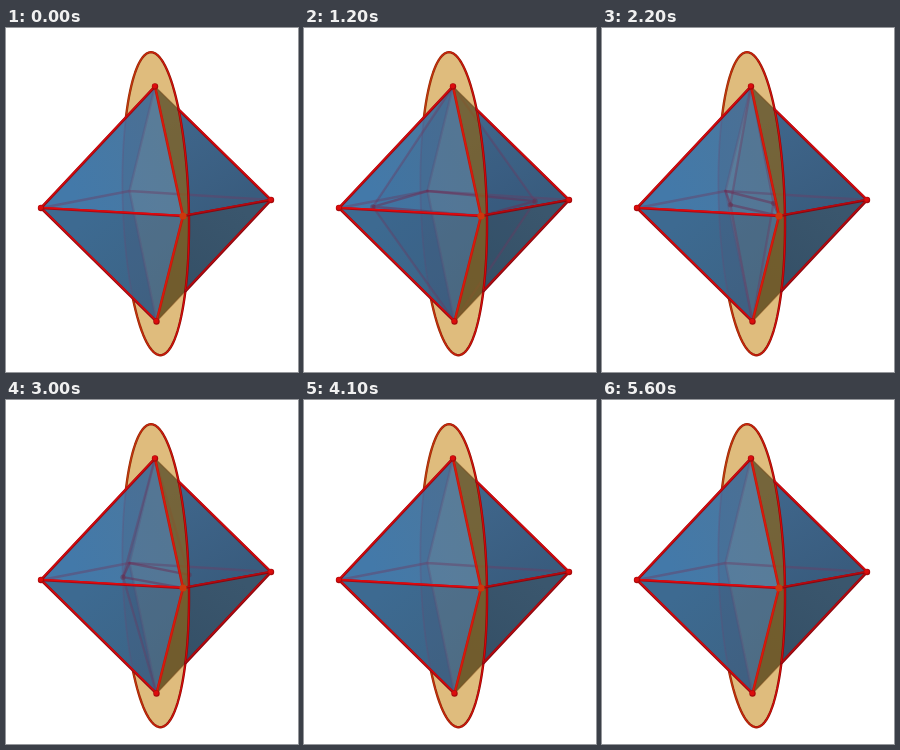
An HTML page with a canvas for the animation above (5700 ms loop, 292 px wide and 344 px high).

```html
<!DOCTYPE html>
<html lang="en">
<head>
<meta charset="utf-8">
<title>Octahedron reflection</title>
<style>
html, body { margin: 0; width: 100%; height: 100%; overflow: hidden; background: #fff; }
canvas { display: block; width: 292px; height: 344px; }
</style>
</head>
<body>
<canvas id="stage" width="292" height="344"></canvas>
<script>
const ctx = document.getElementById('stage').getContext('2d');
const LOOP = 5700, START = 400, MOVE = 3700, STEP = 100;

// Octahedron vertices: top, bottom, left, right, front, back
const T = [149, 58.5], B = [150.5, 293.5], L = [35, 180], R = [265, 172];
const F = [177, 188], K = [123.5, 163];
const LEFT = [T, L, B, F], RIGHT = [T, R, B, F], SECTION = [T, K, B, F];

// Where the right silhouette leaves the disk
const TX = [172.5, 81.5], BX = [179.5, 263];

const mix = (a, b, s) => [a[0] + (b[0] - a[0]) * s, a[1] + (b[1] - a[1]) * s];

function shape(points) {
  ctx.beginPath();
  points.forEach(p => ctx.lineTo(p[0], p[1]));
  ctx.closePath();
}

function gradient(from, to, colorA, colorB) {
  const g = ctx.createLinearGradient(...from, ...to);
  g.addColorStop(0, colorA);
  g.addColorStop(1, colorB);
  return g;
}

function face(points, from, to, colorA, colorB) {
  shape(points);
  ctx.fillStyle = gradient(from, to, colorA, colorB);
  ctx.fill();
}

function edges(pairs, color, width) {
  ctx.strokeStyle = color;
  ctx.lineWidth = width;
  ctx.beginPath();
  for (const [a, b] of pairs) {
    ctx.moveTo(...a);
    ctx.lineTo(...b);
  }
  ctx.stroke();
}

// Edge lit from above: dark body with a bright upper side
function tubes(pairs, body, light) {
  edges(pairs, body, 2.6);
  ctx.save();
  ctx.translate(0, -.5);
  edges(pairs, light, 1.4);
  ctx.restore();
}

function dot(p, r, color) {
  ctx.fillStyle = color;
  ctx.beginPath();
  ctx.arc(p[0], p[1], r, 0, 2 * Math.PI);
  ctx.fill();
}

// Circle in the mirror plane, seen in projection
function disk() {
  ctx.beginPath();
  for (let i = 0; i < 120; i++) {
    const a = i * Math.PI / 60;
    ctx.lineTo(149.7 + 4.7 * Math.cos(a) + 33 * Math.sin(a), 175.7 + 151.5 * Math.cos(a));
  }
  ctx.closePath();
}

function inside(points, draw) {
  ctx.save();
  shape(points);
  ctx.clip();
  draw();
  ctx.restore();
}

function outside(points, draw) {
  ctx.save();
  shape(points);
  ctx.rect(0, 0, 292, 344);
  ctx.clip('evenodd');
  draw();
  ctx.restore();
}

function fillDisk(color) {
  disk();
  ctx.fillStyle = color;
  ctx.fill();
}

function strokeDisk(color, width) {
  disk();
  ctx.strokeStyle = color;
  ctx.lineWidth = width;
  ctx.stroke();
}

function solid() {
  face([T, R, F], [170, 90], [225, 180], '#3f668b', '#395c7e');
  face([R, B, F], [230, 178], [170, 270], '#3a566d', '#344f66');
  face([T, L, F], [70, 170], [165, 130], '#4379a9', '#4a789f');
  face([L, B, F], [80, 190], [155, 270], '#3d6a91', '#3c6486');
  inside(LEFT, () => {
    outside(SECTION, () => fillDisk('rgba(75,85,115,.22)'));
    strokeDisk('rgba(105,75,115,.3)', 1.8);
  });
  inside(SECTION, () => fillDisk('rgba(150,140,125,.2)'));
  edges([[K, T], [K, B]], 'rgba(100,75,115,.3)', 2.4);
  edges([[K, L], [K, R]], 'rgba(108,60,100,.45)', 2.4);
}

// Copy whose left and right vertices travel through the plane
function copy(s) {
  if (s <= 0 || s >= 1) return;
  const a = mix(L, R, s), b = mix(R, L, s);
  const [near, far] = s < .5 ? [a, b] : [b, a];
  shape([T, near, B, far]);
  ctx.fillStyle = 'rgba(45,75,110,.1)';
  ctx.fill();
  for (const p of [near, far]) {
    edges([[p, T], [p, B]], 'rgba(108,55,95,.4)', 2.3);
    edges([[p, F], [p, K]], 'rgba(108,45,85,.5)', 2.4);
    dot(p, 2.6, 'rgba(100,45,75,.5)');
  }
}

function draw(s) {
  ctx.fillStyle = '#fff';
  ctx.fillRect(0, 0, 292, 344);
  ctx.lineCap = 'round';
  ctx.lineJoin = 'round';

  fillDisk('#dfbc7d');
  solid();
  copy(s);
  inside(RIGHT, () => fillDisk('rgba(150,100,10,.62)'));
  edges([[T, TX], [B, BX]], 'rgba(125,75,20,.5)', 1.2);
  outside(LEFT, () => {
    strokeDisk(gradient([117, 175], [183, 175], '#963408', '#8c0406'), 2.4);
    strokeDisk(gradient([117, 175], [183, 175], '#c03c0c', '#d80408'), 1.2);
  });

  tubes([[R, BX], [F, R]], '#860810', '#b8080e');
  tubes([[T, L], [L, B], [TX, R]], '#960a12', '#d8080c');
  tubes([[L, F]], '#a80a14', '#e4080c');
  tubes([[T, F], [F, B]], '#b81c0c', '#dc180c');
  for (const p of [T, B, L, R]) {
    dot(p, 3.2, '#a80a0c');
    dot([p[0] - .3, p[1] - .4], 2.4, '#dc0c0c');
  }
  dot(F, 3.6, '#cc380c');
}

function tick() {
  const t = Math.floor(performance.now() % LOOP / STEP) * STEP;
  const u = Math.min(1, Math.max(0, (t - START) / MOVE));
  draw(Math.pow(u, 1.25));
  requestAnimationFrame(tick);
}
tick();
</script>
</body>
</html>
```
